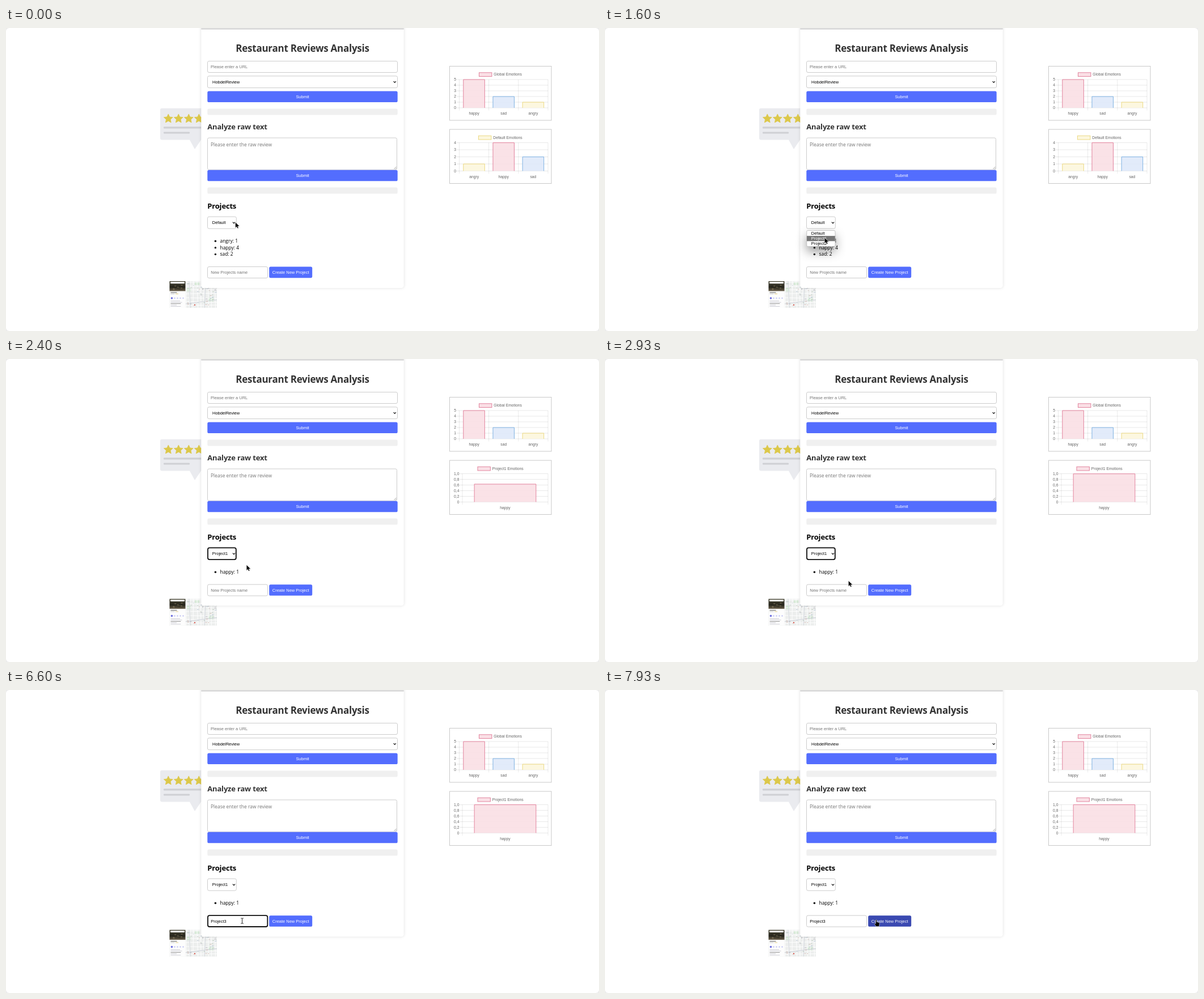
Write an HTML page that moves like this. It is 1046x535 px and loops after 8 s.

```html
<!DOCTYPE html>
<html lang="en">
<head>
<meta charset="utf-8">
<title>Restaurant Reviews Analysis</title>
<style>
  html, body { margin: 0; width: 100%; height: 100%; overflow: hidden; background: #ebebeb; }
  svg { display: block; width: 100vw; height: 100vh; }
  text { white-space: pre; }
  .ui { font: 7.48px "Liberation Sans", Arial, sans-serif; }
  .chart { font: 6.75px "Liberation Sans", Arial, sans-serif; fill: #666; }
  .body { font: 8.45px "Open Sans", "Noto Sans", sans-serif; }
  .h1 { font: bold 17px "Open Sans", "Noto Sans", sans-serif; letter-spacing: -.25px; }
  .h2 { font: bold 13px "Open Sans", "Noto Sans", sans-serif; letter-spacing: -.18px; }
  .card { filter: drop-shadow(0 0 2.8px rgba(0, 0, 0, .13)); }
  .popup { filter: drop-shadow(0 9px 9px rgba(0, 0, 0, .38)); }
</style>
</head>
<body>
<svg id="stage" viewBox="0 0 1046 535" xmlns="http://www.w3.org/2000/svg"></svg>
<script>
const LOOP = 8000;
const BLUE = '#536dfe', BLUE_DARK = '#3a49b1', GREY = '#757575';
const stage = document.getElementById('stage');

const rect = (x, y, w, h, fill, extra = '') =>
  `<rect x="${x}" y="${y}" width="${w}" height="${h}" fill="${fill}" ${extra}/>`;
const text = (x, y, cls, str, fill, extra = '') =>
  `<text x="${x}" y="${y}" class="${cls}" ${fill ? `fill="${fill}"` : ''} ${extra}>${str}</text>`;
const path = (d, extra) => `<path d="${d}" ${extra}/>`;
const group = (id, inner, extra = '') => `<g id="${id}" ${extra}>${inner}</g>`;
const MIDDLE = 'text-anchor="middle"';

const field = (x, y, w, h, id = '') =>
  rect(x, y, w, h, '#fff', `rx="2.6" stroke="#ccc" ${id && `id="${id}"`}`);
const button = (x, y, w, label, id = '') =>
  rect(x, y, w, 19.6, BLUE, `rx="2.6" ${id && `id="${id}"`}`) +
  text(x + w / 2, y + 12.5, 'ui', label, '#fff', MIDDLE);
const chevron = (x, y) =>
  path(`M${x - 2.1} ${y - 1.1}l2.1 2.2l2.1-2.2`, 'fill="none" stroke="#111" stroke-width="1.2"');
const bar = y => rect(355.3, y, 335.4, 11, '#f0f0f0', 'rx="2.6"');

function star(cx, cy, r) {
  let d = '';
  for (let i = 0; i < 10; i++) {
    const a = -Math.PI / 2 + i * Math.PI / 5, q = i % 2 ? r * .48 : r;
    d += (i ? 'L' : 'M') + (cx + q * Math.cos(a)).toFixed(2) + ' ' + (cy + q * Math.sin(a)).toFixed(2);
  }
  return path(d + 'z', 'fill="#dcc84a" stroke="#dcc84a" stroke-width=".8" stroke-linejoin="round"');
}

function bubble() {
  return path('M275 141.800H390V197.500H344L333 214L324 197.500H275a3 3 0 0 1-3-3V144.800a3 3 0 0 1 3-3z', 'fill="#eaebef"') +
    [286.3, 304.3, 322.3, 340.3].map(x => star(x, 160.2, 8.3)).join('') +
    rect(278, 174.300, 80, 3.2, '#cfd0d4', 'rx="1"') + rect(278, 183.400, 46, 3.2, '#cfd0d4', 'rx="1"');
}

function seeded(seed) {
  return () => (seed = (seed * 16807) % 2147483647) / 2147483647;
}

// Small listing panel beside a street map
function thumbnail() {
  const rnd = seeded(71);
  let s = rect(288, 447, 84, 47, '#eceeed') + rect(288.5, 447, 28, 47, '#fdfdfd');
  s += rect(288.5, 447, 28, 17.5, 'url(#photo)');
  for (let i = 0; i < 14; i++)
    s += rect(289 + rnd() * 24, 453 + rnd() * 9, 3, 1.5, i % 2 ? '#8a7f62' : '#2a2a1e', 'opacity=".6"');
  s += rect(290, 448.300, 25, 3, '#fff', 'rx="1.2"');
  s += rect(290.5, 466.500, 11, 1.2, '#777') + rect(290.5, 469, 7, .8, '#bbb') + rect(299, 469, 5, .8, '#d9c06a');
  s += '<circle cx="292.5" cy="477" r="1.8" fill="#6d6fe0"/>';
  for (let i = 1; i < 5; i++) s += `<circle cx="${292.5 + i * 5}" cy="477" r="1.3" fill="#c9cbf3"/>`;
  for (let i = 0; i < 5; i++) s += rect(290.5, 481.500 + i * 2.400, 9 + rnd() * 14, .8, i == 2 ? '#777' : '#c2c2cc');
  s += rect(319, 459, 7, 6, '#d3e7d3') + rect(333, 449, 8, 5, '#d8ead8') + rect(357, 476, 9, 7, '#d5e8d5');
  let roads = '';
  for (let i = 0; i < 9; i++) roads += `M${318 + i * 6.300} 447l${(rnd() * 4 - 2).toFixed(1)} 47`;
  for (let i = 0; i < 7; i++) roads += `M317 ${449 + i * 6.800}l55 ${(rnd() * 4 - 2).toFixed(1)}`;
  s += path(roads, 'stroke="#fff" stroke-width="1" fill="none"');
  s += path('M323 447L325 494M317 487L372 480M352 447L350 494', 'stroke="#d2d6dc" stroke-width="1.1" fill="none"');
  for (let i = 0; i < 38; i++)
    s += rect(318 + rnd() * 51, 448 + rnd() * 44, 1 + rnd() * 2.5, .8, ['#8fa5bd', '#a3b8a5', '#c39a8e', '#9b9ba6'][i % 4], 'opacity=".75"');
  return s + '<circle cx="333" cy="489" r="1.1" fill="#d33b30"/>';
}

const TONES = {
  happy: ['#fae0e6', '#e2839d'],
  sad: ['#e0eafa', '#7fb2e2'],
  angry: ['#fcf7de', '#ecd982']
};

function chart(c, grow = 1) {
  const { y, title, legend, data, max, step, format } = c;
  const names = Object.keys(data), tone = TONES[names[0]];
  const left = format ? 805 : 799.5, right = 956, top = y + 23.500, base = top + 50;
  const slot = (right - left) / names.length, w = slot * .72;
  let grid = '', s = rect(782.5, y, 179.5, 95.500, '#fff', 'stroke="#c9c9c9"');
  s += rect(legend, y + 11.300, 22.4, 6.700, tone[0], `stroke="${tone[1]}"`);
  s += text(legend + 25.8, y + 16.700, 'chart', title);
  for (let i = 0; i <= max / step + .01; i++) {
    const gy = base - i * step / max * 50;
    grid += `M${left - 4.5} ${gy}H${right}`;
    s += text(left - 5.5, gy + 2.300, 'chart', format ? format(i * step) : i * step, '', 'text-anchor="end"');
  }
  for (let i = 0; i <= names.length; i++) grid += `M${left + i * slot} ${top}V${base + 4.5}`;
  s += path(grid, 'stroke="#000" stroke-opacity=".11" stroke-width=".8" fill="none"');
  names.forEach((name, i) => {
    const mid = left + (i + .5) * slot, h = data[name] / max * 50 * grow, [fill, edge] = TONES[name];
    s += path(`M${mid - w / 2} ${base}v${-h}h${w}v${h}`, `fill="${fill}" fill-opacity=".93" stroke="${edge}"`);
    s += text(mid, base + 12.200, 'chart', name, '', MIDDLE);
  });
  return s;
}

const GLOBAL = { y: 67.5, title: 'Global Emotions', legend: 834.5, data: { happy: 5, sad: 2, angry: 1 }, max: 5, step: 1 };
const DEFAULT = { y: 179, title: 'Default Emotions', legend: 833.5, data: { angry: 1, happy: 4, sad: 2 }, max: 4, step: 1 };
const PROJECT = { y: 179, title: 'Project1 Emotions', legend: 832, data: { happy: 1 }, max: 1, step: .2,
  format: v => v ? v.toFixed(1).replace('.', ',') : '0' };

const list = data => Object.entries(data).map(([name, n], i) =>
  `<circle cx="369.4" cy="${376.2 + i * 11.700}" r="1.7"/>` +
  text(377.5, 378.900 + i * 11.700, 'body', `${name}: ${n}`)).join('');

const ring = (id, x, y, w, h) =>
  rect(x, y, w, h, 'none', `id="${id}" rx="3" stroke="#101010" stroke-width="1.8"`);

const popup = rect(355.8, 357.500, 50.2, 28.3, '#fff', 'rx="2" stroke="#b5b5b5" stroke-width=".8"') +
  rect(356, 357.800, 49.8, 9.200, '#767676', 'id="mark"') +
  ['Default', 'Project1', 'Project2'].map((name, i) =>
    text(363.8, 364.500 + i * 9.300, 'ui', name, '', 'data-row')).join('');

const arrow = path('M0 0V9.800L2.300 7.800L3.900 11L5.700 10.200L4.200 7.100H7.500z',
  'fill="#000" stroke="#fff" stroke-width=".5"');
const beam = path('M-2.300-4.600H-.5L0-4.200L.5-4.600H2.300M0-4.200V4.200M-2.300 4.600H-.5L0 4.200L.5 4.600H2.300',
  'fill="none" stroke="#222" stroke-width="1"');
const hand = path('M-.9 .6Q0-.7 .9 .6V4.200L4.800 5.200Q6 5.700 5.700 7.400L4.800 12.200H-.2L-3 8Q-3.400 6.500-1.900 6.600L-.9 7.500z',
  'fill="#000" stroke="#fff" stroke-width=".5"');

stage.innerHTML =
  '<defs><linearGradient id="photo" x2="0" y2="1"><stop stop-color="#4c4a39"/><stop offset=".6" stop-color="#25241b"/><stop offset="1" stop-color="#6a5f4b"/></linearGradient></defs>' +
  rect(0, 0, 1046, 535, '#fff', 'rx="6"') +
  bubble() + group('thumb', thumbnail()) +
  rect(344.3, -10, 357.4, 469, '#fff', 'rx="4.500" class="card" id="card"') +
  rect(344.3, 0, 357.4, 2.800, '#dadada') +
  text(523, 42.300, 'h1', 'Restaurant Reviews Analysis', '#333', MIDDLE) +
  field(355.5, 58.5, 335, 20) + text(361, 71, 'ui', 'Please enter a URL', GREY) +
  field(355.5, 84.8, 335, 20.8) + text(364, 97.800, 'ui', 'HobdelReview', '#000') + chevron(685.7, 95.2) +
  button(355.3, 111.5, 335.4, 'Submit') + bar(142.5) +
  text(355.3, 179.300, 'h2', 'Analyze raw text', '#333') +
  field(355.5, 194, 334, 56.300) + text(361, 209.400, 'body', 'Please enter the raw review', GREY) +
  path('M684.500 249L688.500 245M687 249.300L688.800 247.500', 'stroke="#777" stroke-width=".7"') +
  button(355.3, 250.7, 335.4, 'Submit') + bar(281.5) +
  text(355.3, 318.500, 'h2', 'Projects', '#000') +
  field(355.5, 333.2, 50.8, 21) + ring('selectRing', 356, 333.4, 49.8, 20.700) +
  text(363.8, 346.300, 'ui', '', '#000', 'id="choice"') + chevron(402, 343.7) +
  group('items', '') +
  group('form',
    field(355.5, 421.5, 106, 20) + ring('inputRing', 356, 421.6, 105.3, 19.800) +
    text(361.3, 434.200, 'ui', '', '#000', 'id="entry"') +
    rect(361, 427.5, .8, 8, '#000', 'id="caret"') +
    button(464.2, 421.6, 76, 'Create New Project', 'create')) +
  group('popup', popup, 'class="popup"') +
  chart(GLOBAL) + group('second', '') +
  group('pointer', group('arrow', arrow) + group('beam', beam) + group('hand', hand));

const $ = id => document.getElementById(id);
const show = (id, on) => $(id).setAttribute('visibility', on ? 'visible' : 'hidden');
const clamp = v => Math.max(0, Math.min(1, v));
const rows = stage.querySelectorAll('[data-row]');

const OPEN = 660, PICK = 2125, LOADED = 2180, FOCUS = 3525, BLUR = 7925, BLINK = 530;
const WORD = 'Project3';
const KEYS = [4395, 4725, 4795, 5065, 5125, 5325, 5525, 6065];
const TRACK = [
  [0, 404.5, 343], [270, 401, 344.2], [1040, 401, 344.2], [1595, 387.3, 370.4], [2110, 387.3, 370.4],
  [2400, 424.2, 363.6], [2930, 429.4, 391.6], [3200, 413.5, 406.5], [3700, 413.5, 406.5],
  [3800, 416.6, 407.6], [6840, 416.6, 407.6], [7600, 478.5, 405.4], [LOOP, 478.5, 405.4]
];

function pointerAt(t) {
  const i = TRACK.findIndex(p => p[0] > t), a = TRACK[i - 1], b = TRACK[i];
  const k = (t - a[0]) / (b[0] - a[0]), e = k * k * (3 - 2 * k);
  return [a[1] + (b[1] - a[1]) * e, a[2] + (b[2] - a[2]) * e];
}

function caretOn(t, typed) {
  if (t < FOCUS || t >= BLUR) return false;
  const last = typed ? KEYS[typed - 1] : FOCUS;
  return t - last < BLINK || t - last >= 2 * BLINK;
}

function draw(t) {
  const [x, y] = pointerAt(t);
  const loaded = t >= LOADED, shift = loaded ? -23.4 : 0;

  const open = t >= OPEN && t < PICK;
  show('popup', open);
  $('popup').setAttribute('opacity', clamp((t - OPEN + 50) / 180));
  const row = y > 367 ? 1 : 0;
  $('mark').setAttribute('y', 357.8 + row * 9.3);
  rows.forEach((r, i) => r.setAttribute('fill', i === row ? '#fff' : '#000'));

  $('choice').textContent = t >= PICK ? 'Project1' : 'Default';
  show('selectRing', t >= PICK && t < FOCUS);
  $('items').innerHTML = list((loaded ? PROJECT : DEFAULT).data);
  $('card').setAttribute('height', 469 + shift);
  for (const id of ['form', 'thumb']) $(id).setAttribute('transform', `translate(0 ${shift})`);

  const grow = 1 - Math.pow(1 - clamp((t - LOADED) / 1000), 4);
  $('second').innerHTML = loaded ? chart(PROJECT, grow) : chart(DEFAULT);

  const typed = KEYS.filter(k => t >= k).length, entry = $('entry');
  entry.textContent = typed ? WORD.slice(0, typed) : 'New Projects name';
  entry.setAttribute('fill', typed ? '#000' : GREY);
  show('inputRing', t >= FOCUS && t < BLUR);
  show('caret', caretOn(t, typed));
  $('caret').setAttribute('x', typed ? 361.2 + entry.getComputedTextLength() : 361);

  const onButton = x > 464 && y > 398, onField = !onButton && x < 461 && y > 398;
  $('create').setAttribute('fill', onButton ? BLUE_DARK : BLUE);
  show('hand', onButton);
  show('beam', onField);
  show('arrow', !onButton && !onField);
  $('pointer').setAttribute('transform', `translate(${x} ${y})`);
}

const start = performance.now();
function tick() {
  draw((performance.now() - start) % LOOP);
  requestAnimationFrame(tick);
}
tick();
</script>
</body>
</html>
```
